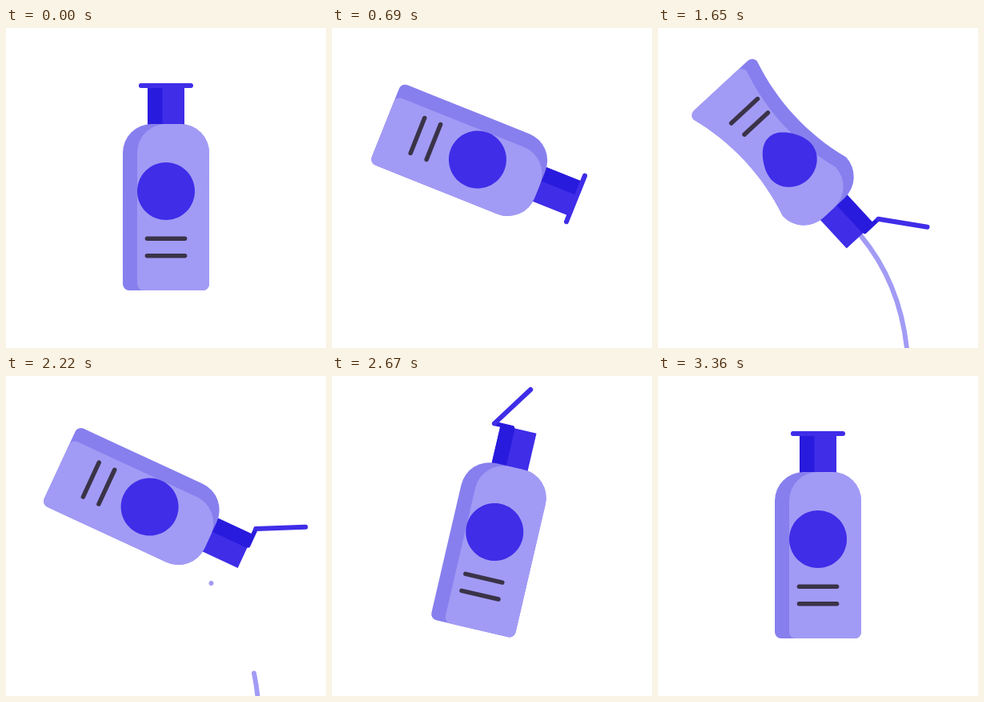
Write an HTML page that moves like this. It is 400 px wide and 400 px high and loops after 5390 ms.

```html
<!DOCTYPE html>
<html lang="en">
<head>
<meta charset="utf-8">
<title>Pouring bottle</title>
<style>
  html, body { margin: 0; width: 100%; height: 100%; overflow: hidden; background: #fff; }
  svg { display: block; width: 100%; height: 100%; }
  .main { fill: #3f2de8; }
  .dark { fill: #291bdd; }
  .shade { fill: #877fee; }
  .light { fill: #a29bf5; }
  .line { fill: none; stroke-linecap: round; }
</style>
</head>
<body>
<svg viewBox="0 0 400 400">
  <path id="stream" class="line" d="M253 259Q302 318 311 400L312 412" pathLength="100" stroke="#a29bf5" stroke-width="6"/>
  <!-- bottle space: the origin is the centre of the round label -->
  <g id="bottle">
    <rect class="main" x="-23" y="-132" width="46" height="52"/>
    <rect class="dark" x="-23" y="-132" width="18.5" height="52"/>
    <path class="line" d="M-31-132H-8" stroke="#291bdd" stroke-width="5.5"/>
    <path id="lid" class="line" d="M-31-132H31" stroke="#3f2de8" stroke-width="6"/>
    <path id="back" class="shade"/>
    <path id="front" class="light"/>
    <path id="label" class="main"/>
    <path id="text" class="line" stroke="#3a3348" stroke-width="5.5"/>
  </g>
</svg>
<script>
const LOOP = 5390;
const $ = id => document.getElementById(id);
const [stream, bottle, lid, back, front, label, text] =
  ['stream', 'bottle', 'lid', 'back', 'front', 'label', 'text'].map($);

// Monotone cubic curve through [time, value] keys, flat at both ends.
function curve(keys) {
  const n = keys.length;
  const rate = i => (keys[i + 1][1] - keys[i][1]) / (keys[i + 1][0] - keys[i][0]);
  const slope = keys.map((k, i) => {
    if (i === 0 || i === n - 1) return 0;
    const a = rate(i - 1), b = rate(i);
    return a * b > 0 ? 2 * a * b / (a + b) : 0;
  });
  return t => {
    if (t <= keys[0][0]) return keys[0][1];
    if (t >= keys[n - 1][0]) return keys[n - 1][1];
    let i = 0;
    while (t > keys[i + 1][0]) i++;
    const [t0, v0] = keys[i], [t1, v1] = keys[i + 1];
    const h = t1 - t0, p = (t - t0) / h, q = 1 - p;
    return v0 * q * q * (1 + 2 * p) + v1 * p * p * (3 - 2 * p) +
      h * p * q * (slope[i] * q - slope[i + 1] * p);
  };
}

const tilt = curve([[0, 0], [300, 37.5], [690, 111.7], [1080, 132], [1500, 137.2], [1950, 137.2],
  [2160, 122], [2220, 115], [2670, 13.2], [2700, 10.8], [2900, 2.5], [3360, 0]]);
const opening = curve([[780, 0], [1060, 128], [1950, 128], [2220, 116.8],
  [2670, 56.3], [3240, 5.5], [3360, 0]]);
const squeeze = curve([[1080, 0], [1500, 1], [1720, 1], [2140, 0]]);
const head = curve([[1100, 0], [1500, 100]]);
const tail = curve([[1950, 0], [2350, 100]]);
const drift = curve([[1950, 0], [2220, 3.5]]);

// Place of the label centre for a given tilt.
function place(deg) {
  const a = deg * Math.PI / 180, s = Math.sin(a), c = Math.cos(a) - 1;
  const k = Math.max(0, deg - 113) / 24;
  return [
    200 - 0.399 * deg + 6.57 * c + 38.3 * s + 3 * k * k,
    204 - 0.878 * deg + 6.57 * s - 38.3 * c + 8.5 * k * k
  ];
}

function body(left, q) {
  const w = 54, pinch = 16 * q, r = 36, c = 8;
  return `M${left} -48A${r} ${r} 0 0 1 ${left + r} -84H${w - r}A${r} ${r} 0 0 1 ${w} -48` +
    `C${w - pinch} 6 ${w - pinch} 62 ${w} 116A${c} ${c} 0 0 1 ${w - c} 124` +
    `H${left + c}A${c} ${c} 0 0 1 ${left} 116` +
    `C${left + pinch} 62 ${left + pinch} 6 ${left} -48Z`;
}

const narrow = (y, q) => 1 - 0.225 * q * Math.exp(-(((y - 37) / 36) ** 2));

function disc(q) {
  const pts = [];
  for (let i = 0; i < 72; i++) {
    const a = i * Math.PI / 36, y = 36 * Math.sin(a);
    pts.push((36 * Math.cos(a) * narrow(y, q)).toFixed(2) + ' ' + y.toFixed(2));
  }
  return 'M' + pts.join('L') + 'Z';
}

function bar(y, q) {
  const x = 23.6 * narrow(y, q);
  return `M${-x} ${y}H${x}`;
}

function draw(t) {
  const deg = tilt(t), q = squeeze(t), [x, y] = place(deg);
  bottle.setAttribute('transform', `translate(${x} ${y}) rotate(${deg})`);
  lid.setAttribute('transform', `rotate(${-opening(t)} -31 -132)`);
  back.setAttribute('d', body(-54, q));
  front.setAttribute('d', body(-36, q));
  label.setAttribute('d', disc(q));
  text.setAttribute('d', bar(59.3, q) + bar(80.8, q));

  const from = tail(t), to = head(t);
  stream.style.visibility = to - from > 0.1 ? 'visible' : 'hidden';
  stream.setAttribute('stroke-dasharray', `0 ${from} ${to - from} 200`);
  stream.setAttribute('transform', `translate(${drift(t)} 0)`);
}

const start = performance.now();
function tick() {
  draw((performance.now() - start) % LOOP);
  requestAnimationFrame(tick);
}
draw(0);
requestAnimationFrame(tick);
</script>
</body>
</html>
```
